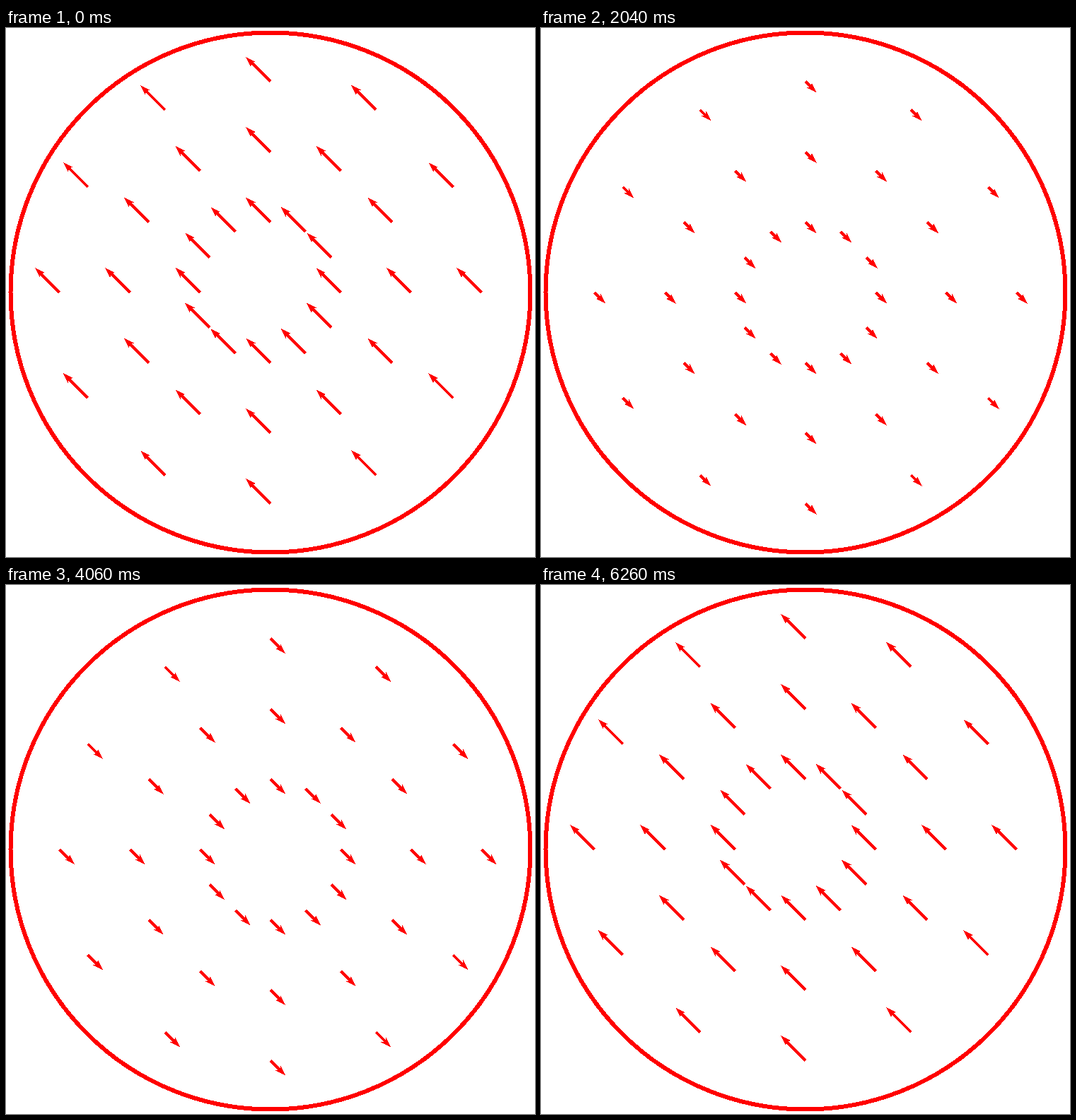
An HTML page that plays this animation: 748x748 px, repeating every 6.28 s.

```html
<!DOCTYPE html>
<html lang="en">
<head>
<meta charset="utf-8">
<title>Oscillating vector field</title>
<style>
  html, body { margin: 0; width: 100%; height: 100%; overflow: hidden; background: #fff; }
  svg { display: block; width: 100%; height: 100%; shape-rendering: crispEdges; }
</style>
</head>
<body>
<svg viewBox="0 0 748 748">
  <defs>
    <g id="arrow">
      <path id="shaft" stroke="red" stroke-width="4"/>
      <path id="head" fill="red"/>
    </g>
  </defs>
  <circle cx="374" cy="374" r="367.5" fill="none" stroke="red" stroke-width="6"/>
  <g id="field"></g>
</svg>
<script>
const LOOP = 6280, STEP = 20, CENTRE = 374, SPACING = 99.4;
const AMPLITUDE = 35 * Math.SQRT2, HEAD = 15;
const $ = id => document.getElementById(id);

// Three rings of twelve arrows
let uses = '';
for (let ring = 1; ring <= 3; ring++) {
  for (let i = 0; i < 12; i++) {
    const a = i * Math.PI / 6, r = ring * SPACING;
    const x = CENTRE + r * Math.cos(a), y = CENTRE + r * Math.sin(a);
    uses += `<use href="#arrow" x="${x.toFixed(2)}" y="${y.toFixed(2)}"/>`;
  }
}
$('field').innerHTML = uses;

function draw(ms) {
  const t = Math.floor((ms % LOOP) / STEP) * STEP / 1000;
  const swing = -Math.cos(t);
  const length = AMPLITUDE * Math.abs(swing);
  const head = Math.min(HEAD, length);
  const notch = length - head * 0.78, back = length - head, half = head / 3;

  $('field').style.display = Math.abs(swing) < 0.06 ? 'none' : '';
  $('arrow').setAttribute('transform', `rotate(${swing < 0 ? -135 : 45})`);
  $('shaft').setAttribute('d', `M0 0H${notch}`);
  $('head').setAttribute('d', `M${length} 0L${back} ${half}L${notch} 0L${back} ${-half}Z`);
}

const start = performance.now();
function tick() {
  draw(performance.now() - start);
  requestAnimationFrame(tick);
}
draw(0);
requestAnimationFrame(tick);
</script>
</body>
</html>
```
